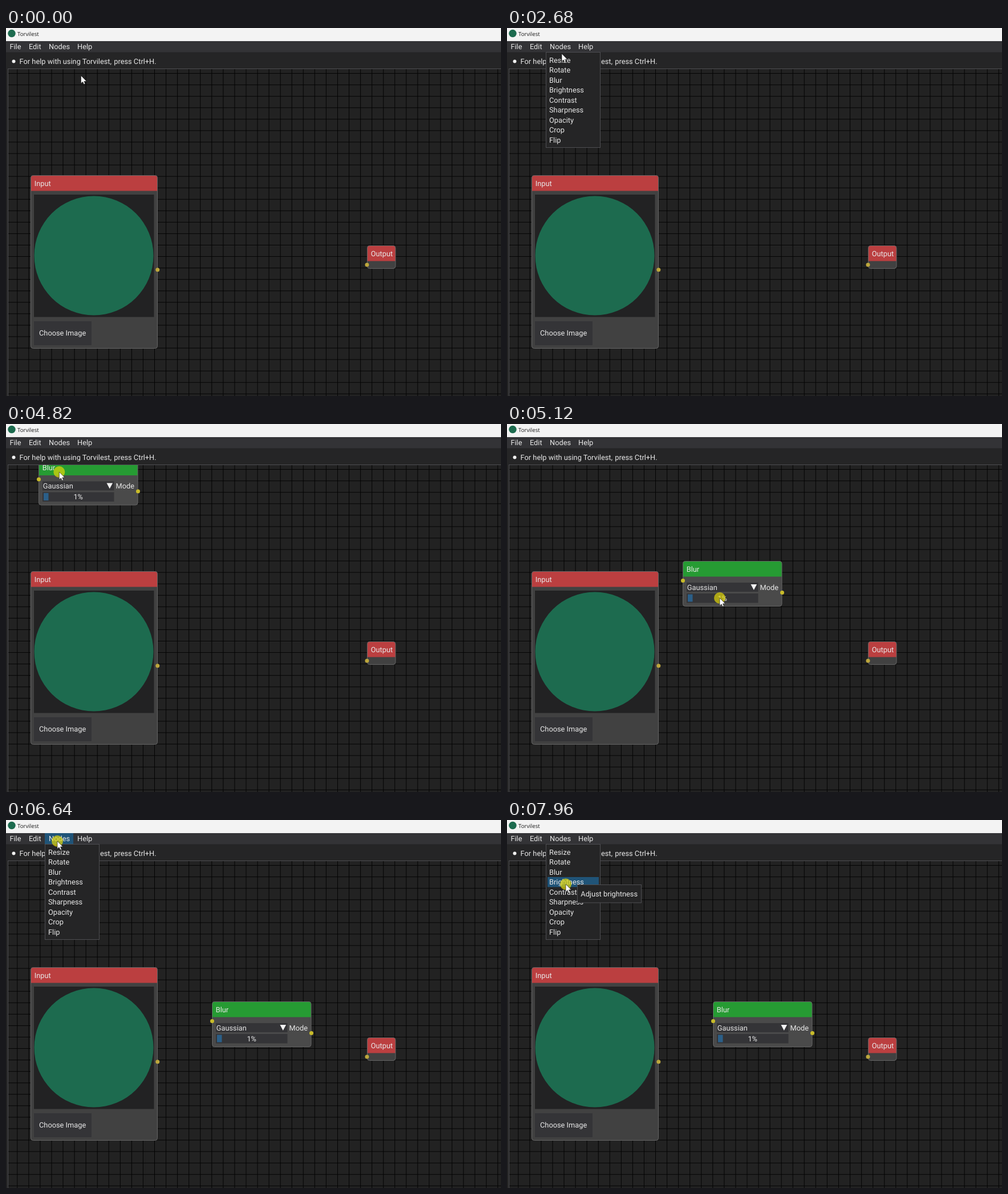
Recreate the animation shown at these times as an HTML page with a canvas. Size 868x645 px, loop 8 s.

```html
<!DOCTYPE html>
<html lang="en">
<head>
<meta charset="utf-8">
<title>Node editor</title>
<style>
html, body { margin: 0; width: 100%; height: 100%; overflow: hidden; background: #222; }
canvas { display: block; width: 868px; height: 645px; }
</style>
</head>
<body>
<canvas id="stage"></canvas>
<script>
const W = 868, H = 645, LOOP = 8000;
const canvas = document.getElementById('stage');
const dpr = window.devicePixelRatio || 1;
canvas.width = W * dpr;
canvas.height = H * dpr;
const ctx = canvas.getContext('2d');
ctx.scale(dpr, dpr);
ctx.textRendering = 'geometricPrecision';

const UI = '12.8px Roboto, sans-serif';
const INK = '#e8e8e8', PANEL = '#252526', EDGE = '#4e4e52', BLUE = '#205478';
const GREEN = '#1d6b4f', RED = '#bb3f40';
const APP = 'Torvilest';

const ITEMS = ['Resize', 'Rotate', 'Blur', 'Brightness', 'Contrast', 'Sharpness', 'Opacity', 'Crop', 'Flip'];
const TIPS = ['Resize image', 'Rotate image', 'Blur image', 'Adjust brightness'];
const ROW = 17.5, ROW_TOP = 47.5;

// Pointer: start time, number of 100 ms steps, goal
const MOVES = [
  [880, 4, 99, 25.5], [2080, 2, 99, 28],
  [2380, 4, 96, 45], [2780, 4, 95, 63], [3200, 4, 93.3, 84],
  [4920, 1, 170, 146], [5020, 1, 285, 233], [5120, 1, 373, 305],
  [5220, 1, 395, 337], [5320, 1, 397, 340],
  [5640, 9, 90, 37], [7040, 7, 103, 112.5]
];
// Dragged node: time, corner
const NODE = [
  [3920, 57.5, 63], [4920, 105.5, 98], [5020, 212.5, 172],
  [5120, 308.5, 240.5], [5220, 352.5, 308], [5320, 361.5, 318.5]
];
const PRESSED = [[1480, 1680], [3820, 4020], [4820, 5320], [6540, 6740], [7960, LOOP]];
const MENU_OPEN = [[1480, 3920], [6640, LOOP]];

const within = (spans, t) => spans.some(([a, b]) => t >= a && t < b);

function pointerAt(t) {
  let x = 131.5, y = 83.5;
  for (const [start, steps, gx, gy] of MOVES) {
    if (t < start) break;
    const p = Math.min(steps, Math.floor((t - start) / 100) + 1) / steps;
    const e = p * p * (3 - 2 * p);
    x += (gx - x) * e;
    y += (gy - y) * e;
  }
  return { x, y };
}

function rect(x, y, w, h, fill) {
  ctx.fillStyle = fill;
  ctx.fillRect(x, y, w, h);
}

function box(x, y, w, h, fill, edge) {
  rect(x, y, w, h, fill);
  ctx.strokeStyle = edge;
  ctx.lineWidth = 1;
  ctx.strokeRect(x, y, w, h);
}

function disc(x, y, r, fill) {
  ctx.fillStyle = fill;
  ctx.beginPath();
  ctx.arc(x, y, r, 0, Math.PI * 2);
  ctx.fill();
}

function poly(points, fill) {
  ctx.fillStyle = fill;
  ctx.beginPath();
  points.forEach(([x, y]) => ctx.lineTo(x, y));
  ctx.closePath();
  ctx.fill();
}

// Text set around a vertical middle
function label(text, x, mid, align = 'left', font = UI, fill = INK) {
  ctx.font = font;
  ctx.fillStyle = fill;
  ctx.textAlign = align;
  ctx.fillText(text, x, mid + 4.6);
}

function frame(x, y, w, h, title, head, body) {
  ctx.fillStyle = body;
  ctx.beginPath();
  ctx.roundRect(x, y, w, h, 4);
  ctx.fill();
  ctx.fillStyle = head;
  ctx.beginPath();
  ctx.roundRect(x, y, w, 27, [4, 4, 0, 0]);
  ctx.fill();
  ctx.strokeStyle = '#646464';
  ctx.lineWidth = 1;
  ctx.beginPath();
  ctx.roundRect(x, y, w, h, 4);
  ctx.stroke();
  label(title, x + 6.2, y + 13.5);
}

function drawGrid() {
  rect(4, 72, W, H, '#222222');
  ctx.strokeStyle = '#040404';
  ctx.lineWidth = 1;
  ctx.beginPath();
  for (let x = 19.8; x < W; x += 20.06) {
    ctx.moveTo(x, 72);
    ctx.lineTo(x, H);
  }
  for (let y = 79.6; y < H; y += 20.06) {
    ctx.moveTo(4, y);
    ctx.lineTo(W, y);
  }
  ctx.stroke();
}

function drawInput() {
  frame(43.5, 258.5, 222, 303, 'Input', RED, '#414141');
  rect(49, 292, 210.5, 214.5, '#222223');
  disc(154, 399, 104.5, GREEN);
  rect(49, 514, 101, 42, '#343437');
  label('Choose Image', 58, 534.3);
  disc(265.8, 423.8, 3.5, '#bda73c');
}

function drawOutput() {
  frame(633.5, 381.5, 49.5, 40, 'Output', RED, '#414141');
  disc(633, 415, 3.5, '#bda73c');
}

function drawBlur(x, y) {
  ctx.save();
  ctx.translate(x, y);
  frame(0, 0, 173.5, 79, 'Blur', '#269b33', '#4a4a4a');
  rect(6.5, 37.5, 125.5, 16, '#343437');
  label('Gaussian', 7.2, 45.4);
  poly([[119, 40.5], [129.6, 40.5], [124.3, 50.5]], '#f2f2f2');
  label('Mode', 135, 45.4);
  rect(6.5, 56.5, 125.5, 16.5, '#343437');
  rect(8.5, 58, 8.5, 13, '#2b5f88');
  label('1%', 69.2, 64.4, 'center');
  disc(0, 34, 3.5, '#c8bb2a');
  disc(174, 55, 3.5, '#c8bb2a');
  ctx.restore();
}

function drawChrome(hover) {
  rect(0, 0, W, 23, '#f3f3f3');
  disc(10, 9.5, 6.7, GREEN);
  label(APP, 20, 9, 'left', '9.7px "Open Sans", sans-serif', '#1c1c1c');
  rect(0, 23, W, 19.5, '#333336');
  if (hover) rect(68, 23, 50, 19.5, BLUE);
  label('File', 6.4, 32.6);
  label('Edit', 39.9, 32.6);
  label('Nodes', 75, 32.6);
  label('Help', 125, 32.6);
  disc(13.5, 58.5, 3, '#f0f0f0');
  label('For help with using ' + APP + ',', 23.6, 58.5);
  label('press Ctrl+H.', 263.6, 58.5, 'right');
}

function drawMenu(row, pointer) {
  box(68.5, 42.5, 95, 167, PANEL, EDGE);
  if (row >= 0) rect(71, ROW_TOP + row * ROW, 90, ROW, BLUE);
  ITEMS.forEach((name, i) => label(name, 74, 56.1 + i * ROW));
  if (!TIPS[row]) return;
  ctx.font = UI;
  const w = Math.round(ctx.measureText(TIPS[row]).width + 12);
  const x = Math.floor(pointer.x + 20.6) + 0.5, y = Math.floor(pointer.y + 1) + 0.5;
  box(x, y, w, 31.5, PANEL, EDGE);
  label(TIPS[row], x + 5.8, y + 16);
}

function drawPointer({ x, y }, pressed) {
  if (pressed) disc(x, y, 10, 'rgba(225,215,10,.7)');
  ctx.save();
  ctx.translate(x, y);
  poly([[0, 0], [0, 13.5], [3.1, 10.8], [5.1, 15.2], [7.3, 14.2], [5.4, 10], [9.6, 9.7]], '#fff');
  ctx.strokeStyle = '#151515';
  ctx.lineWidth = 0.6;
  ctx.stroke();
  ctx.restore();
}

function draw(t) {
  const pointer = pointerAt(t);
  const { x, y } = pointer;
  const onNodes = x > 68 && x < 118 && y > 23 && y < 42.5;
  const row = x > 71 && x < 161 ? Math.floor((y - ROW_TOP) / ROW) : -1;
  const node = NODE.filter(k => t >= k[0]).pop();

  rect(0, 0, W, H, PANEL);
  ctx.save();
  ctx.beginPath();
  ctx.rect(4, 72, W, H);
  ctx.clip();
  drawGrid();
  drawInput();
  drawOutput();
  if (node) drawBlur(node[1], node[2]);
  ctx.restore();

  rect(3, 71, W, 1, EDGE);
  rect(3, 71, 1, H, EDGE);
  drawChrome(onNodes);
  if (within(MENU_OPEN, t)) drawMenu(row, pointer);
  drawPointer(pointer, within(PRESSED, t));
}

const begin = performance.now();
function tick() {
  draw((performance.now() - begin) % LOOP);
  requestAnimationFrame(tick);
}
tick();
</script>
</body>
</html>
```
